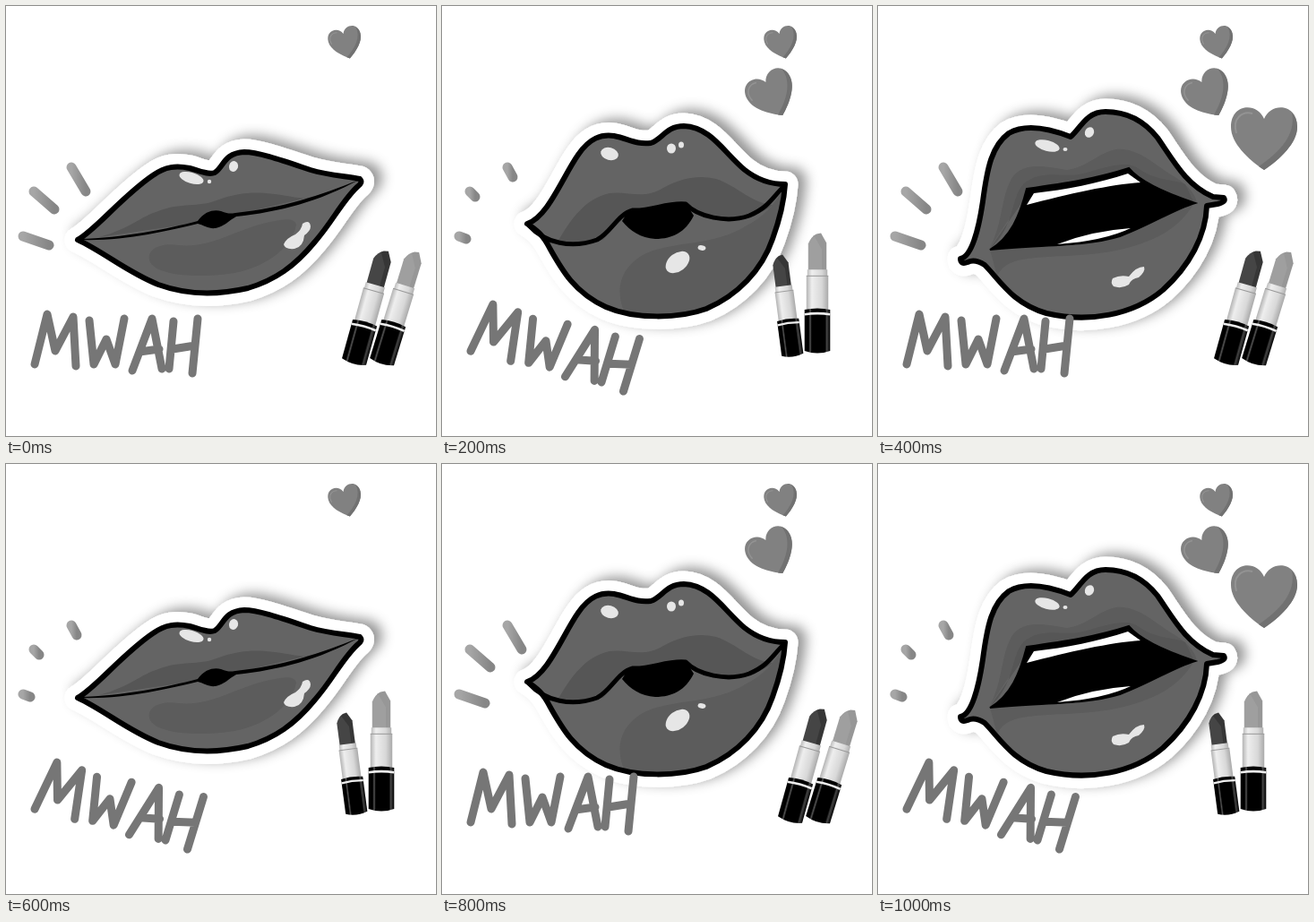
An HTML page for the animation above (1200 ms loop, 480x480 px).

```html
<!DOCTYPE html>
<html lang="en">
<head>
<meta charset="utf-8">
<title>Mwah</title>
<style>
html, body { margin: 0; width: 100%; height: 100%; overflow: hidden; background: #fff; }
svg { display: block; width: 100%; height: 100%; }
.lip { fill: #646464; }
.edge { fill: none; stroke: #000; stroke-width: 6; stroke-linejoin: round; }
.paper { fill: #fff; stroke: #fff; stroke-width: 29; stroke-linejoin: round; filter: url(#drop); }
.line { fill: none; stroke: #000; stroke-width: 5; stroke-linecap: round; stroke-linejoin: round; }
.shade { fill: #565656; }
.soft { fill: #5c5c5c; }
.shine { fill: #e6e6e6; }
.ray { stroke: url(#rayTone); stroke-width: 11; stroke-linecap: round; }
.word { fill: none; stroke: #767676; stroke-width: 9; stroke-linecap: round; stroke-linejoin: round; }
</style>
</head>
<body>
<svg viewBox="0 0 480 480">
  <defs>
    <filter id="drop" x="-20%" y="-20%" width="140%" height="140%">
      <feDropShadow dx="9" dy="-4" stdDeviation="7" flood-color="#000" flood-opacity=".42"/>
    </filter>
    <linearGradient id="rayTone">
      <stop stop-color="#a6a6a6"/><stop offset="1" stop-color="#868686"/>
    </linearGradient>
    <linearGradient id="metal">
      <stop stop-color="#b4b4b4"/><stop offset=".25" stop-color="#eee"/>
      <stop offset=".7" stop-color="#d8d8d8"/><stop offset="1" stop-color="#aaa"/>
    </linearGradient>
    <linearGradient id="case">
      <stop stop-color="#000"/><stop offset=".16" stop-color="#000"/>
      <stop offset=".22" stop-color="#555"/><stop offset=".28" stop-color="#000"/>
      <stop offset=".8" stop-color="#000"/><stop offset=".87" stop-color="#444"/>
      <stop offset="1" stop-color="#000"/>
    </linearGradient>
    <g id="heart">
      <path fill="#818181" d="M0 34C-18 22-37 4-37-14C-37-40-8-42 0-23C8-42 37-40 37-14C37 4 18 22 0 34Z"/>
      <path fill="#717171" d="M0 34C18 22 37 4 37-14Q37-24 31-30C36-6 18 14-6 30Z"/>
      <path fill="none" stroke="#939393" stroke-width="2" d="M-31-7C-36-24-24-32-13-29"/>
    </g>
    <g id="stick">
      <path d="M-10-87V-119Q-7-127-1-130L4-131 10-120V-87Z"/>
      <path fill="#fff" opacity=".08" d="M-10-87V-119Q-7-126-3-127L5-113V-87Z"/>
      <path fill="url(#metal)" d="M-11-91H11V-84H12V-44H-12V-84H-11Z"/>
      <path stroke="#999" d="M-12-84H12"/>
      <path fill="url(#case)" d="M-14-47Q0-50 14-47V-2Q0 3-14-2Z"/>
      <path fill="none" stroke="#eee" stroke-width="2.5" d="M-14-42Q0-44 14-42"/>
    </g>
  </defs>
  <g id="lips"></g>
  <g id="hearts">
    <use href="#heart" transform="translate(379.5 42) rotate(-15) scale(.5)"/>
    <use href="#heart" transform="translate(369 100) rotate(-27) scale(.73)"/>
    <use href="#heart" transform="translate(431 149)"/>
  </g>
  <g id="rays"></g>
  <path id="word" class="word" role="img" aria-label="MWAH" d="M32 400L46 344 55 385 75 347 78 402M93 351L98 400 112 372 122 400 132 349M141 407L163 349 174 405M149 386L171 383M187 352L182 405M214 349L208 410M186 383L211 379"/>
  <use id="dark" href="#stick" fill="#363636"/>
  <use id="pale" href="#stick" fill="#979797"/>
</svg>
<script>
const $ = id => document.getElementById(id);
const path = (cls, d) => `<path class="${cls}" d="${d}"/>`;
const spot = (x, y, rx, ry, turn = 0) =>
  `<ellipse class="shine" rx="${rx}" ry="${ry}" transform="translate(${x} ${y}) rotate(${turn})"/>`;

const poses = [
  { // closed
    lip: 'M80 261C100 250 130 212 164 189C178 179 190 178 205 181C216 184 226 189 233 186C243 180 243 164 266 163C282 163 310 173 340 183C360 189 380 190 395 193Q399 197 392 202C375 218 365 240 345 263C322 291 300 306 270 315C235 323 200 322 170 311C135 297 110 275 80 261Z',
    tone: path('shade', 'M104 258C140 248 150 235 170 229C195 219 215 225 235 217C258 208 280 207 300 210C330 214 345 220 362 208L257 233 214 242Z') +
      path('soft', 'M161 286C155 272 172 264 192 267C232 271 255 248 300 240Q322 235 324 244C320 270 290 290 260 297C225 304 170 303 161 286Z'),
    mouth: '<path d="M82 260C130 259 180 249 214 240C222 229 232 227 240 229C248 232 250 232 256 231C310 225 350 212 394 194C350 218 305 230 257 235C248 240 244 246 234 248C226 249 222 245 214 243C180 251 130 263 82 261Z"/>',
    shine: spot(207, 192, 14, 6, 17) + spot(227, 196, 2.2, 2.2) + spot(254, 179, 5, 6, 15) +
      path('shine', 'M331 243Q339 238 340 246Q340 251 333 256Q332 269 322 271Q311 272 310 266Q313 259 323 255Q330 250 331 243Z')
  },
  { // pout
    lip: 'M95 243C118 236 135 190 152 166C165 147 178 143 192 145C208 148 216 155 233 153C246 149 250 134 270 134C300 135 315 164 338 183C352 194 366 199 383 199C382 215 377 238 369 260C357 295 330 323 295 338C265 349 215 350 183 336C148 320 134 295 120 270C113 256 106 250 95 243Z',
    tone: path('shade', 'M128 265C145 236 160 215 187 209C207 206 225 217 247 203C270 190 290 189 306 193C330 201 345 220 369 222C350 239 310 245 279 230L270 220 209 228 180 261Z') +
      path('soft', 'M205 345C191 316 200 290 228 276C260 262 305 268 340 245Q366 232 381 204L390 260 330 345Z'),
    mouth: '<path d="M201 240Q208 228 214 227C240 228 250 219 272 220L281 234C272 252 258 260 238 260C222 259 210 251 201 240Z"/>' +
      path('line', 'M97 245C115 265 145 271 173 261C190 252 195 233 213 228C235 229 250 219 272 221C285 235 318 243 343 234C366 224 369 213 382 201'),
    shine: spot(187, 165, 10, 7, 14) + spot(256, 159, 5, 5.5) + spot(267, 155, 3, 3.5) +
      spot(263, 286, 15, 10, -38) + spot(290, 270, 4.5, 2.8, 10)
  },
  { // open
    lip: 'M92 282C104 280 112 252 117 218C122 180 127 156 146 142C165 131 192 137 215 146C226 137 232 118 254 118C277 118 296 127 312 147C330 173 344 200 374 213L386 214Q389 219 379 221L367 223C366 256 348 290 318 317C285 345 235 354 188 343C150 332 136 306 119 289Q108 282 100 286Q92 289 92 282Z',
    tone: path('soft', 'M124 271C139 245 137 217 147 197C158 171 190 180 211 183C234 180 247 163 266 160C290 158 309 177 325 187C344 198 354 208 356 220L280 184 168 205Z') +
      path('shade', 'M124 272C153 247 147 217 162 199C184 180 209 194 233 186C260 178 280 172 293 183C313 196 335 194 343 199L353 220 280 188 168 209Z') +
      path('soft', 'M125 272L133 302C140 286 155 282 190 280C235 278 272 276 307 260Q337 247 353 220L300 245 225 267Z'),
    mouth: '<path stroke="#000" stroke-width="2" d="M125 272C148 258 158 235 166 204C209 198 243 193 280 181C293 197 324 210 354 220C330 227 303 245 270 257C231 269 180 266 125 272Z"/>' +
      '<path fill="#fff" d="M174 209C210 205 245 198 279 187L293 197C260 199 212 210 166 222Z"/>' +
      '<path fill="#fff" d="M200 266Q238 251 282 248Q253 262 200 266Z"/>',
    shine: spot(189, 156, 14, 6, 15) + spot(209, 160, 2.5, 2) + spot(236, 141, 5, 6, 25) +
      path('shine', 'M262 304Q270 300 280 302Q288 291 297 291Q299 296 291 303Q283 304 280 311Q272 316 263 313Q259 309 262 304Z')
  }
];

$('lips').innerHTML = poses.map((p, i) => `<g>
  ${path('paper', p.lip)}
  <clipPath id="clip${i}"><path d="${p.lip}"/></clipPath>
  ${path('lip', p.lip)}
  <g clip-path="url(#clip${i})">${p.tone}</g>
  ${p.mouth}${path('edge', p.lip)}${p.shine}</g>`).join('');

// Each ray: start, long end, short end
const rays = [[73, 180, 89, 207, 79, 191], [31, 207, 54, 227, 37, 213], [19, 257, 48, 267, 27, 260]];
const word = ['', 'translate(0 -15) rotate(11.5 31 400)'];
const dark = ['translate(388 399) rotate(15.5)', 'translate(391.5 391) rotate(-7.5) scale(.87)'];
const pale = ['translate(419 399) rotate(17)', 'translate(419 387) scale(1.02)'];

const show = (el, on) => { el.style.display = on ? '' : 'none'; };
let last = -1;

function draw(now) {
  const step = Math.floor(now / 200) % 6;
  if (step !== last) {
    last = step;
    const pose = step % 3, alt = step % 2;
    [...$('lips').children].forEach((el, i) => show(el, i === pose));
    [...$('hearts').children].forEach((el, i) => show(el, i <= pose));
    $('rays').innerHTML = rays.map(r =>
      path('ray', `M${r[0]} ${r[1]}L${r[2 + alt * 2]} ${r[3 + alt * 2]}`)).join('');
    $('word').setAttribute('transform', word[alt]);
    $('dark').setAttribute('transform', dark[alt]);
    $('pale').setAttribute('transform', pale[alt]);
  }
}

const start = performance.now();
function tick() {
  draw(performance.now() - start);
  requestAnimationFrame(tick);
}
tick();
</script>
</body>
</html>
```
